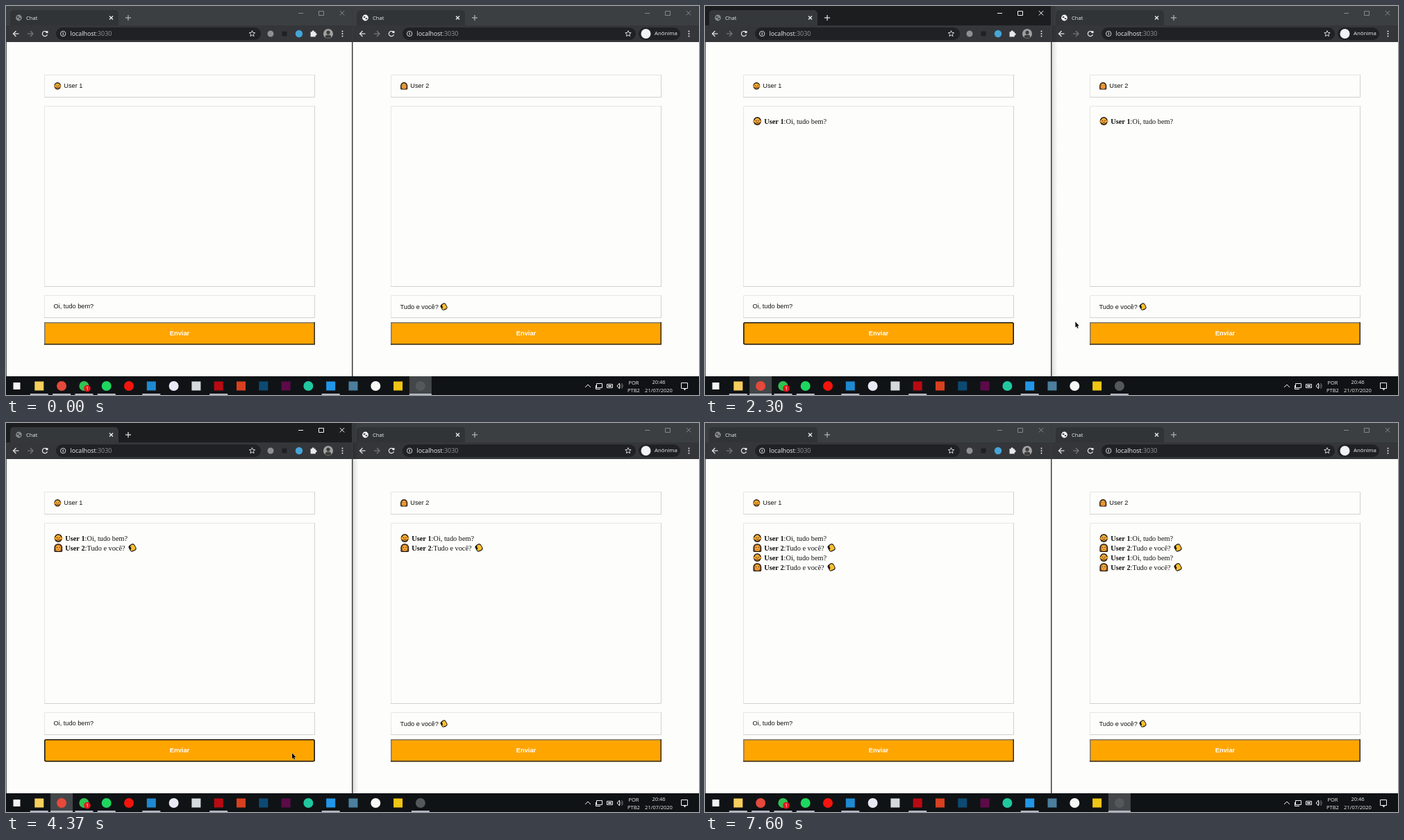
An HTML page with a canvas for the animation above (7630 ms loop, 998 px wide and 561 px high).

```html
<!DOCTYPE html>
<html lang="pt">
<head>
<meta charset="utf-8">
<title>Chat</title>
<style>
html, body { margin: 0; width: 998px; height: 561px; overflow: hidden; background: #fdfdfb; }
canvas { display: block; }
</style>
</head>
<body>
<canvas id="stage" width="998" height="561"></canvas>
<script>
const c = document.getElementById('stage').getContext('2d');
const LOOP = 7630;
const UI = '"Open Sans", "Noto Sans", sans-serif';
const SANS = '"Liberation Sans", Arial, sans-serif';
const SERIF = '"Liberation Serif", "Times New Roman", serif';
const PAGE = '#fdfdfb', LIGHT = '#e8eaed', INK = '#111';
const PEOPLE = [
  { name: 'User 1', says: 'Oi, tudo bem?', face: man },
  { name: 'User 2', says: 'Tudo e você?', face: woman, waves: true }
];

// The pointer enters, clicks the two buttons in turn, rests and leaves
const STOPS = [
  { t: 900, x: 560, y: 565 },
  { t: 1680, x: 263, y: 472, side: 0 },
  { t: 2950, x: 740, y: 460, side: 1 },
  { t: 4330, x: 412, y: 476, side: 0 },
  { t: 5190, x: 669, y: 472, side: 1 },
  { t: 6500, x: 669, y: 472 },
  { t: 7330, x: 597, y: 565, side: -1 }
];
const ARRIVE = 180, LEAVE = 60, SEND = 80, BOW = 10;

function rect(x, y, w, h, color) {
  c.fillStyle = color;
  c.fillRect(x, y, w, h);
}
function round(x, y, w, h, r, color) {
  c.fillStyle = color;
  c.beginPath();
  c.roundRect(x, y, w, h, r);
  c.fill();
}
function frame(x, y, w, h, color, lw = 1, r = 0) {
  c.strokeStyle = color;
  c.lineWidth = lw;
  c.beginPath();
  c.roundRect(x, y, w, h, r);
  c.stroke();
}
function dot(x, y, r, color, ry = r) {
  c.fillStyle = color;
  c.beginPath();
  c.ellipse(x, y, r, ry, 0, 0, 7);
  c.fill();
}
function square(x, y, r, color) {
  rect(x - r, y - r, 2 * r, 2 * r, color);
}
function arc(x, y, r, color, lw = 1, from = 0, to = 7) {
  c.strokeStyle = color;
  c.lineWidth = lw;
  c.beginPath();
  c.arc(x, y, r, from, to);
  c.stroke();
}
function line(color, lw, ...p) {
  c.strokeStyle = color;
  c.lineWidth = lw;
  c.beginPath();
  for (let i = 0; i < p.length; i += 2) c.lineTo(p[i], p[i + 1]);
  c.stroke();
}
function text(s, x, y, font, color, align = 'left') {
  c.font = font;
  c.fillStyle = color;
  c.textAlign = align;
  c.fillText(s, x, y);
  return x + c.measureText(s).width;
}
function at(x, y, scale, draw) {
  c.save();
  c.translate(x, y);
  c.scale(scale, scale);
  draw();
  c.restore();
}

// Small signs
function cross(x, y, r, color, lw) {
  line(color, lw, x - r, y - r, x + r, y + r);
  line(color, lw, x + r, y - r, x - r, y + r);
}
function plus(x, y, r, color) {
  line(color, 1.2, x - r, y, x + r, y);
  line(color, 1.2, x, y - r, x, y + r);
}
function arrow(x, y, dir, color) {
  const tip = x + 4 * dir;
  line(color, 1.2, x - 4 * dir, y, tip, y);
  line(color, 1.2, x, y - 4, tip, y, x, y + 4);
}
function star(x, y) {
  const p = [];
  for (let i = 0; i <= 10; i++) {
    const a = i * Math.PI / 5 - Math.PI / 2, r = i % 2 ? 2 : 4.4;
    p.push(x + r * Math.cos(a), y + r * Math.sin(a));
  }
  line(LIGHT, .9, ...p);
}
function globe(x, y, color) {
  dot(x, y, 4.4, color);
  dot(x - 1.4, y - 1, 1.5, '#2f3336', 1);
  dot(x + 1.5, y + 1.3, 1.4, '#2f3336', 1);
}

// Emoji, about 12 px wide around the origin
function features() {
  for (const s of [-1, 1]) dot(1.6 * s, -.5, .7, '#222');
}
function man() {
  dot(0, 0, 5.5, '#1d1813', 6);
  for (const s of [-1, 1]) dot(5 * s, .2, 1.2, '#f0a02c');
  dot(0, .3, 4.2, '#ffad33', 4.6);
  arc(0, .6, 3.7, '#5d3814', 1.4, .5, Math.PI - .5);
  line('#5d3814', 1, -1.6, 2, 1.6, 2);
  features();
}
function woman() {
  round(-5.8, -6, 11.6, 12, [6, 6, 2, 2], '#1d1813');
  round(-4.8, -5, 9.6, 10, [5, 5, 1, 1], '#87532a');
  dot(0, .4, 3.5, '#ffad33', 4.1);
  line('#b03a20', .8, -1.3, 2.4, 1.3, 2.4);
  features();
}
function hand() {
  c.rotate(-.5);
  round(-4.8, -5, 7, 10, 3, '#1c1a18');
  round(-3, -5.6, 8, 11, 3.6, '#1c1a18');
  round(-1.8, -4.4, 5.8, 8.6, 2.8, '#ffc02f');
  round(-3.8, .4, 4, 3.4, 1.6, '#ffc02f');
}

function field(x, y, h) {
  frame(x + .5, y + .5, 389, h - 1, '#e6e6e1');
  line('#d3d3cd', 1, x, y + h - .5, x + 389.5, y + h - .5, x + 389.5, y);
}
function button(x, focused) {
  const w = 390, h = 32.5, y = 456;
  if (focused) {
    round(x, y, w, h, 2.5, '#ffa500');
    frame(x + .8, y + .8, w - 1.6, h - 1.6, '#1b1b1f', 1.6, 2);
  } else {
    rect(x, y, w, h, '#ffa500');
    line('#7c7974', 1.5, x + .75, y + h, x + .75, y + .75, x + w, y + .75);
    line('#302c28', 1.5, x, y + h - .75, x + w - .75, y + h - .75, x + w - .75, y);
  }
  text('Enviar', x + w / 2, 474.7, 'bold 9.3px ' + SANS, '#fff', 'center');
}

function toolbar(x, side) {
  const y = 40;
  rect(x, 28, 499, 24, '#35363a');
  arrow(x + 14.5, y, -1, LIGHT);
  arrow(x + 35, y, 1, '#77797c');
  arc(x + 56, y, 3.6, LIGHT, 1.2, .3, 5.6);
  square(x + 59, y - 2.4, 1.5, LIGHT);
  round(x + 72, 31, side ? 336 : 295, 18, 9, '#202124');
  arc(x + 82.2, y, 3.7, LIGHT, .9);
  line(LIGHT, 1, x + 82.2, y - 2, x + 82.2, y + 2);
  const end = text('localhost', x + 92.5, 43.2, '8.9px ' + UI, '#eceef0');
  text(':3030', end, 43.2, '8.9px ' + UI, '#94989c');
  star(side ? 896 : 354.5, y);
  for (const d of [-3.5, 0, 3.5]) dot(side ? 983.5 : 484.5, y + d, 1, LIGHT);
  if (side) {
    round(911, 31, 60, 18, 9, '#202124');
    dot(921.5, y, 7, '#f1f3f4');
    text('Anônima', 934, 42.4, '7.8px ' + UI, '#f1f3f4');
  } else {
    dot(381, y, 4.5, '#8d9092');
    square(401, y, 3.5, '#1f2123');
    dot(422, y, 5.2, '#45a5d8');
    square(442.2, y + .8, 3.6, LIGHT);
    dot(442.2, y - 3.2, 1.6, LIGHT);
    dot(446, y + .7, 1.6, LIGHT);
    dot(464, y, 7, '#a2a2a2');
    dot(464, y - 1.8, 2.6, '#3c3c3c');
    dot(464, y + 4, 4.2, '#3c3c3c', 2.6);
  }
}

function titleBar(x, side, active) {
  rect(x, 0, 499, 28, active ? '#1b1d1f' : '#3b3f42');
  round(x + 6, 6, 156, 23, [5, 5, 0, 0], active ? '#35383b' : '#303437');
  globe(x + 18.5, 17, side ? '#f4f5f6' : '#85888b');
  text('Chat', x + 29, 19.8, '7.6px ' + UI, '#eceef0');
  cross(x + 151.5, 17, 2.5, '#f1f3f4', 1.2);
  plus(x + 176, 17, 4, active ? LIGHT : '#b5b8bb');
  const ink = active ? '#f1f3f4' : '#85888b', y = 10.5;
  line(ink, 1, x + 421, y, x + 428, y);
  frame(x + 450.5, y - 3, 7, 6, ink);
  cross(x + 484, y - .3, 3.2, ink, 1);
}

function message(person, x, y) {
  at(x + 20.3, y, 1.02, person.face);
  const end = text(person.name, x + 30.3, y + 3.5, 'bold 10.3px ' + SERIF, INK);
  text(':' + person.says, end, y + 3.5, '10.3px ' + SERIF, INK);
  if (person.waves) at(x + 127, y, .98, hand);
}

function browser(side, active, sent) {
  const x = side * 499, bx = x + 55, me = PEOPLE[side], font = '9.2px ' + SANS;
  titleBar(x, side, active);
  toolbar(x, side);
  rect(x, 52, 499, 482, PAGE);
  field(bx, 99, 33);
  field(bx, 144, 261);
  field(bx, 417, 33);
  at(bx + 19.2, 115.3, .88, me.face);
  text(me.name, bx + 28.3, 118.4, font, INK);
  text(me.says, bx + 13.5, 436 + side, font, INK);
  if (me.waves) at(bx + 76.5, 433.8, .88, hand);
  for (let i = 0; i < sent; i++) message(PEOPLE[i % 2], bx, 166 + 14 * i);
  button(bx, active);
}

function shadow(dir) {
  const g = c.createLinearGradient(499, 0, 499 + 9 * dir, 0);
  g.addColorStop(0, 'rgba(0,0,0,.13)');
  g.addColorStop(1, 'rgba(0,0,0,0)');
  rect(499, 0, 9 * dir, 534, g);
}

// Plain taskbar marks, evenly spaced; an underline means the program runs
const MARKS = `start #f4f4f4, square #f6cf5c open, circle #e5493b open, circle #2fc351 open,
  circle #1ed760 open, circle #f3140d, square #1f8ad2 open, circle #e9e9f6, square #d5d9dc,
  square #b90a13 open, square #d8401f, square #0d4a72, square #5d0a49, circle #20c8a0,
  square #2196e8 open, square #4b7f9d, circle #f7f8f6, square #f0c514, circle #55585b open`
  .split(',').map(s => s.trim().split(' '));

function taskbar(front) {
  const y = 548, lit = front < 0 ? MARKS.length - 1 : 2;
  rect(0, 534, 998, 27, '#101315');
  MARKS.forEach(([shape, color, open], i) => {
    const x = 15.5 + 32.3 * i, half = i === lit ? 16 : 13;
    if (i === lit) rect(x - half, 534, 2 * half, 27, '#43474a');
    if (shape === 'circle') dot(x, y, 7, color);
    else square(x, y, shape === 'start' ? 5 : 6.5, color);
    if (open) rect(x - half, 559, 2 * half, 2, '#b4b8c6');
  });
  dot(117, 551.5, 4.8, '#e8131d');
  text('1', 117, 554.4, '8px ' + UI, '#fff', 'center');
  tray(y);
}

function tray(y) {
  const ink = '#eee', font = '7.5px ' + UI;
  line(ink, 1, 834, y + 2, 838, y - 2, 842, y + 2);
  frame(850.5, y - 3.5, 8, 6, ink);
  line(ink, 1, 849.5, y - 1, 849.5, y + 4.5, 856, y + 4.5);
  frame(865.5, y - 2.5, 8, 5, ink);
  rect(867, y - 1, 5, 2, ink);
  line(ink, 1, 883.5, y - 4, 880, y, 883.5, y + 4, 883.5, y - 4);
  for (const r of [3.8, 6]) arc(882, y, r, '#999', .8, -.7, .7);
  text('POR', 904, 545.6, font, ink, 'center');
  text('PTB2', 904, 557, font, ink, 'center');
  text('20:46', 940, 545.2, font, ink, 'center');
  text('21/07/2020', 940, 557, font, ink, 'center');
  frame(972.5, y - 4.5, 9, 8, ink);
  line(ink, 1.2, 976, y + 3.5, 977.5, y + 5.5, 979, y + 3.5);
}

function pointer(t) {
  const i = STOPS.findIndex(s => s.t > t);
  if (i < 1) return;
  const a = STOPS[i - 1], b = STOPS[i];
  const start = a.t + LEAVE, end = b.t - ARRIVE;
  const u = Math.min(1, Math.max(0, (t - start) / (end - start)));
  const e = u * u * (3 - 2 * u);
  const x = a.x + (b.x - a.x) * e;
  const y = a.y + (b.y - a.y) * e - BOW * Math.sign(b.x - a.x) * Math.sin(Math.PI * u);
  at(x, y, 1, () => {
    const p = new Path2D('M0 0V8.2L1.8 6.6 3 9.6 4.3 9 3.1 6.2 5.4 6Z');
    c.strokeStyle = 'rgba(255,255,255,.6)';
    c.lineWidth = .8;
    c.stroke(p);
    c.fillStyle = '#0b0b0b';
    c.fill(p);
  });
}

function draw(t) {
  const clicks = STOPS.filter(s => 'side' in s && s.t <= t);
  const front = clicks.length ? clicks.at(-1).side : -1;
  const sent = clicks.filter(s => s.side >= 0 && s.t + SEND <= t).length;
  for (const side of [0, 1]) browser(side, front === side, sent);
  if (front >= 0) shadow(front ? -1 : 1);
  rect(498, 0, 1.5, 534, '#3a3b3d');
  rect(0, 52, 1, 482, '#55585a');
  taskbar(front);
  pointer(t);
}

function tick() {
  draw(performance.now() % LOOP);
  requestAnimationFrame(tick);
}
tick();
</script>
</body>
</html>
```
